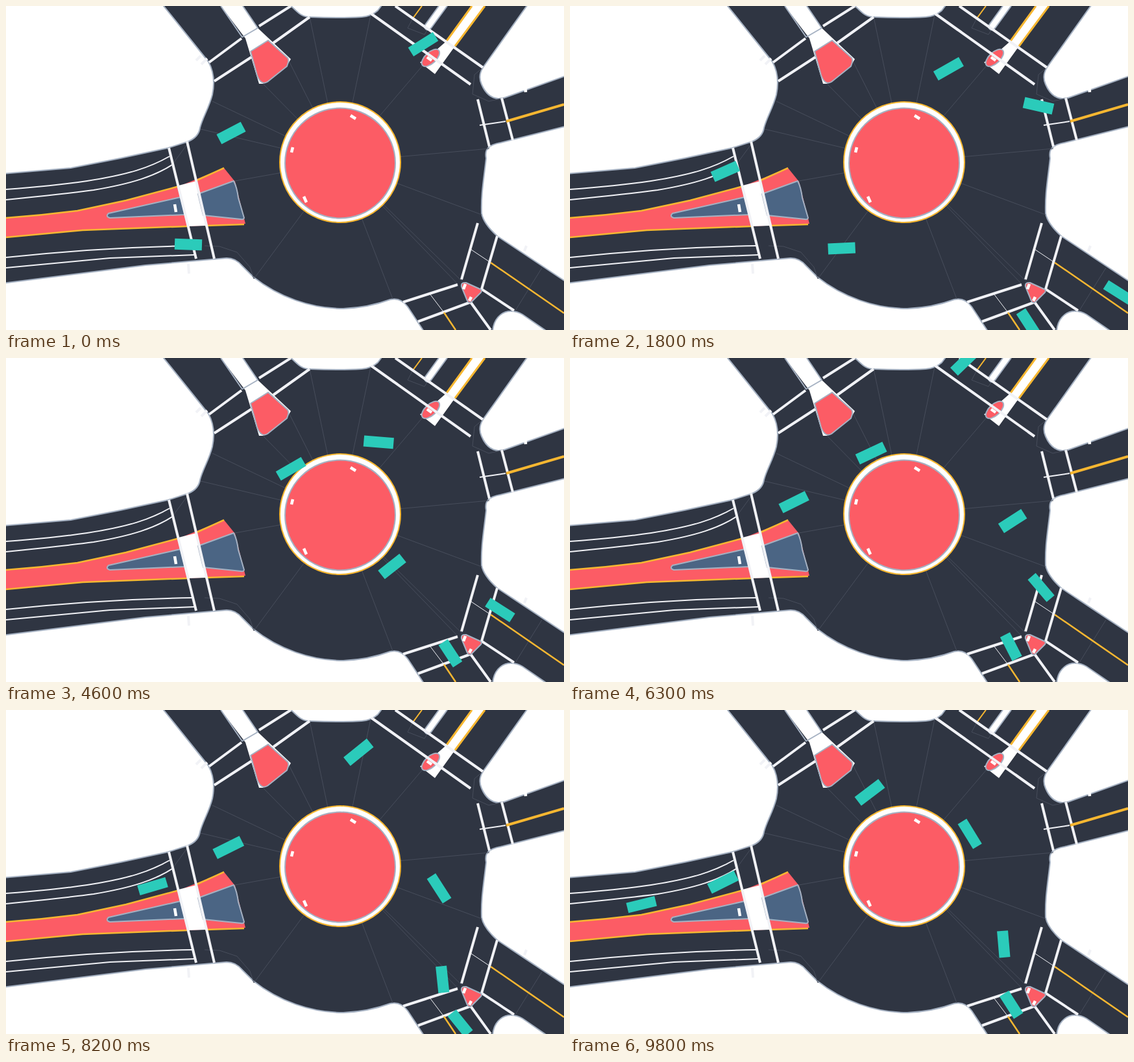
An HTML page for the animation above (9.9 s loop, 860 by 500 pixels).

```html
<!DOCTYPE html>
<html lang="en">
<head>
<meta charset="utf-8">
<title>Roundabout traffic</title>
<style>
  html, body { margin: 0; width: 100%; height: 100%; overflow: hidden; background: #fff; }
  svg { display: block; }
  path { fill: none; }
  .road { fill: #2f3542; }
  .edge { stroke: #a5b1c2; stroke-width: 2; stroke-linejoin: round; }
  .white { fill: #fff; }
  .red { fill: #fc5c65; }
  .blue { fill: #4b6584; }
  .paint { stroke: #f1f2f6; stroke-width: 4; }
  .lane { stroke: #f1f2f6; stroke-width: 2; }
  .hair { stroke: #f1f2f6; stroke-width: 1; }
  .yellow { stroke: #f7b731; stroke-width: 2.5; }
  .seam { stroke: #474d5b; stroke-width: 1; }
  .dash { stroke: #fff; stroke-width: 4.5; }
  #cars { fill: #2bcbba; }
</style>
</head>
<body>
<svg width="860" height="500" viewBox="0 0 860 500">
  <path class="road edge" d="M-5 259L100 250Q175 236 250 219L281 209Q297 202 299 188
    C303 172 313 157 318 137Q324 108 312 86L243 0V-5H436L439 0
    C449 8 454 17 468 17Q515 19 548 17 563 16 573 7L582-5H806L735 95
    Q727 108 733 121 742 142 759 143L767 142 865 107V185L762 211
    C745 214 737 220 740 235C736 270 732 290 733 320Q736 336 757 355L775 367 865 427V505H838
    L796 476Q788 471 778 471C763 471 750 484 750 505H646L619 464
    Q608 449 592 453C565 463 544 466 520 467C470 467 420 449 381 418L364 401Q354 389 340 389L215 400-5 428Z"/>
  <path id="seams" class="seam"/>
  <path class="seam" d="M256 245L281 211M306 370L329 371 356 380 376 403 382 421M735 95L722 106 719 136 744 147 767 142
    M627 19L619 34 645 44 650 36M826 404L785 470"/>

  <path class="red" d="M0 327Q55 323 110 316L185 300 267 278 336 250 353 271 369 336 279 340 118 346 0 357Z"/>
  <path class="yellow" d="M0 327Q55 323 110 316L185 300 267 278M294 269L336 250M0 357L118 346 279 340M307 339L367 337"/>
  <path class="white" d="M266 277L294 270 308 339 280 340Z"/>
  <path class="blue edge" d="M158 320L269 295 276 322 160 327Q153 325 158 320Z"/>
  <path class="blue edge" d="M296 290L351 270Q356 280 358 296L367 327Q366 330 362 329L304 323Z"/>
  <path class="lane" d="M0 283Q70 278 125 270C190 260 222 249 252 232M0 299Q90 290 135 284C195 274 230 262 256 245
    M0 388Q150 372 288 370M0 404L160 389 291 384"/>

  <path class="white" d="M331 0H365L388 34 439 82 433 92 396 120 390 120 369 50Z"/>
  <path class="edge" d="M331 0L364 48 388 34 365 0"/>
  <path class="red edge" d="M377 70L404 53 434 80Q437 83 433 93L403 117Q393 123 387 107Z"/>

  <path class="white" d="M718 0H738L692 62 661 105 638 87 654 76 679 54Z"/>
  <path class="yellow" style="stroke-width:3" d="M718 0L679 54M738 0L692 62"/>
  <path class="white edge" d="M667 0L646 29Q643 35 650 37 653 37 656 33L680 0"/>
  <path class="yellow" style="stroke-width:2" d="M641 0L627 19"/>
  <ellipse class="red edge" rx="17" ry="8.5" transform="translate(654.5 80) rotate(-43)"/>

  <path class="paint" d="M251 219l42 171M279 209l42 181M313 87l50-37M390 31l49-31M321 116l57-37M412 57l56-40
    M563 12l153 109M600 0l135 95M727 144l18 73M764 142l17 65
    M727 335l-25 87M757 355l-24 82 50 33M612 457l84-27M635 487l81-30 31 43
    M293 84l7-7M301 90l9-9M281 398l1 15M802 370l-3 8"/>
  <path class="lane" d="M730 184l40-6"/>
  <path class="hair" d="M717 376l30 20M653 444l22 29"/>
  <path class="yellow" d="M747 396L860 474M675 473L693 500"/>
  <path class="yellow" style="stroke-width:4" d="M771 178L860 152"/>
  <path class="red edge" d="M702 433Q701 426 709 427L731 437Q734 439 732 442L718 456Q714 460 711 455Z"/>

  <circle class="white" cx="515" cy="241" r="93" stroke="#f7b731" stroke-width="2"/>
  <circle class="red edge" cx="515" cy="242.500" r="85"/>
  <path class="dash" d="M531 169l8 5M442 218l-2 8M459 294l4 9M260 306l2 12M649 79l7 5M708 429l-3 8M717 449l-3 6M800 123l1 10"/>
  <g id="cars"></g>
</svg>
<script>
const LOOP = 9.9, STEP = 0.1;
const cars = [];

// Seams in the asphalt run from the centre, under the island, to the kerbs.
const kerbs = "435 83,468 17,562 14,642 92,745 220,733 322,697 430,703 425,596 452,382 421,353 270,300 190,318 147,397 121";
document.getElementById("seams").setAttribute("d", kerbs.split(",").map(p => `M515 241L${p}`).join(""));

// A car is visible from start to end and passes its points at even intervals.
function addCar(length, width, start, end, ...points) {
  const node = document.createElementNS("http://www.w3.org/2000/svg", "rect");
  const size = { x: -length / 2, y: -width / 2, width: length, height: width };
  for (const name in size) node.setAttribute(name, size[name]);
  document.getElementById("cars").append(node);
  cars.push({ node, start, end, points });
}

addCar(45, 16, 0, LOOP, [643, 59], [576, 101], [473, 152], [366, 212], [245, 266], [103, 302]);
addCar(42, 17, 0, 4.3, [347, 196], [215, 265], [33, 307]);
addCar(42, 17, 0, 8, [281, 368], [433, 373], [563, 342], [665, 263], [786, 189]);
addCar(46, 17, 1.5, LOOP, [736, 157], [636, 137], [502, 133], [369, 199], [229, 269]);
addCar(45, 16, 1.5, LOOP, [856, 449], [781, 401], [742, 372], [680, 294], [613, 186]);
addCar(41, 17, 1.5, LOOP, [709, 493], [689, 462], [682, 450], [674, 426], [668, 358]);
addCar(46, 17, 6.1, LOOP, [615, -1], [552, 58], [457, 131]);
addCar(41, 17, 7.7, LOOP, [707, 492], [692, 473], [679, 453]);

// Smooth curve through the points; u counts points passed.
function place(points, u) {
  const last = points.length - 1, i = Math.min(Math.floor(u), last - 1);
  const f = u - i, g = 1 - f;
  const slope = (k, axis) => {
    const a = Math.max(k - 1, 0), b = Math.min(k + 1, last);
    return (points[b][axis] - points[a][axis]) / (b - a);
  };
  return [0, 1].map(axis =>
    g * g * (1 + 2 * f) * points[i][axis] + f * f * (1 + 2 * g) * points[i + 1][axis]
    + f * g * (g * slope(i, axis) - f * slope(i + 1, axis)));
}

function draw(seconds) {
  const t = Math.floor((seconds % LOOP) / STEP + 1e-6) * STEP;
  for (const { node, start, end, points } of cars) {
    const visible = t > start - STEP / 2 && t < end - STEP / 2;
    node.setAttribute("visibility", visible ? "visible" : "hidden");
    if (!visible) continue;
    const u = Math.max(0, t - start) / (end - start) * (points.length - 1);
    const [x, y] = place(points, u), [nextX, nextY] = place(points, u + 0.01);
    const heading = Math.atan2(nextY - y, nextX - x) * 180 / Math.PI;
    node.setAttribute("transform", `translate(${x} ${y}) rotate(${heading})`);
  }
}

let origin;
function tick(now) {
  origin ??= now;
  draw((now - origin) / 1000);
  requestAnimationFrame(tick);
}
draw(0);
requestAnimationFrame(tick);
</script>
</body>
</html>
```
